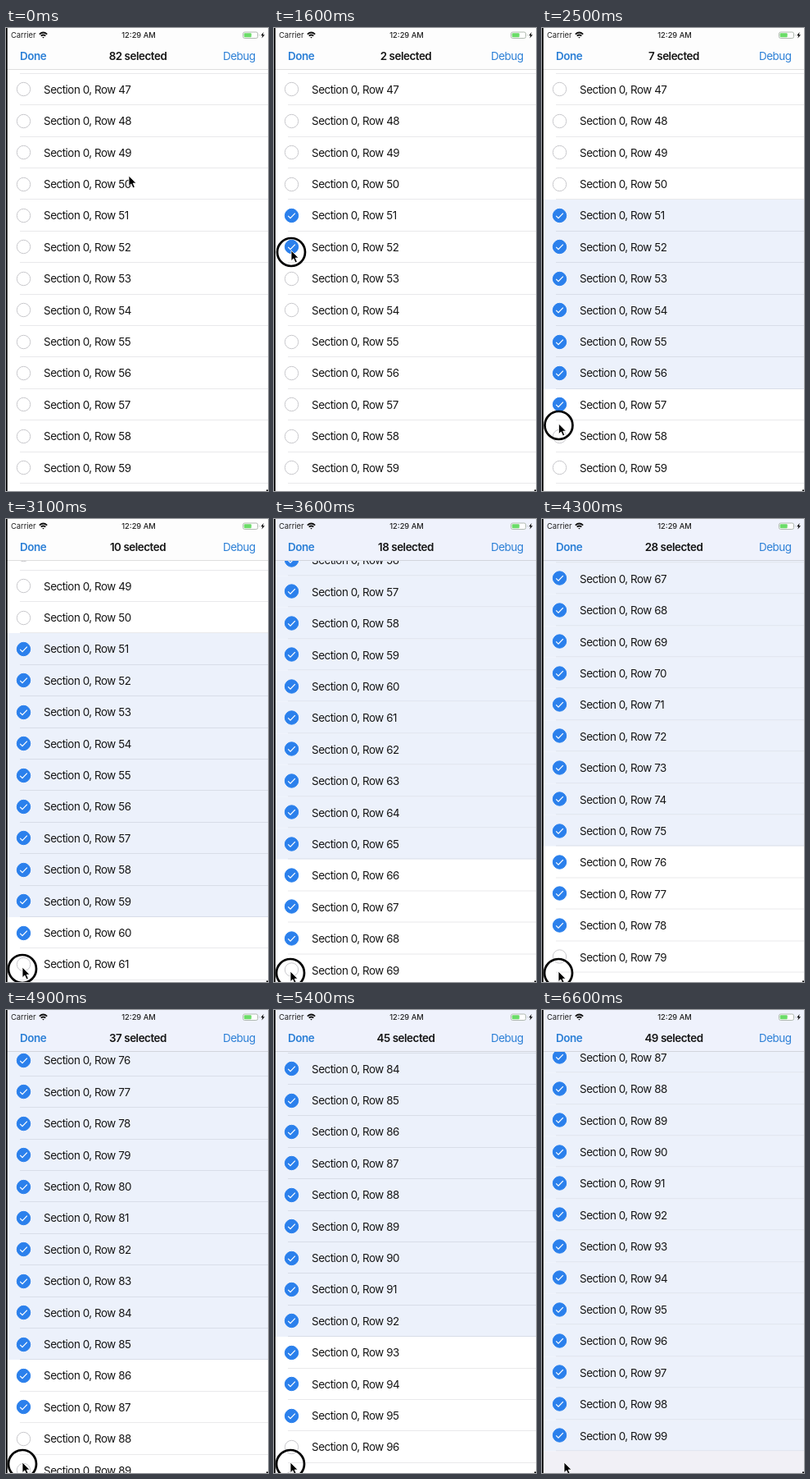
These frames come from a looping animation (320x564 px, 6700 ms). An HTML page:

```html
<!DOCTYPE html>
<html lang="en">
<head>
<meta charset="utf-8">
<title>Multi-select list</title>
<style>
  html, body { margin: 0; width: 100%; height: 100%; overflow: hidden; background: #fff; }
  #stage {
    position: relative; width: 320px; height: 564px; overflow: hidden; background: #fff;
    font: 13.4px/18px Inter, Roboto, sans-serif; letter-spacing: -.46px; color: #151515;
  }
  #list { position: absolute; left: 0; top: 0; width: 320px; }
  .row { position: absolute; left: 0; width: 320px; height: 38.4px; line-height: 38.4px; white-space: pre; }
  .row.lit { background: #ecf1fb; }
  .row::after {
    content: ""; position: absolute; left: 17px; right: 0; bottom: 0; height: 1px; background: rgba(60, 60, 75, .11);
  }
  .row span { position: absolute; left: 46px; }
  .row svg { position: absolute; left: 12px; top: 9.7px; width: 19px; height: 19px; }
  .dot { fill: #fff; stroke: #c9c9cd; }
  .tick { fill: none; stroke: none; stroke-width: 1.2; }
  .on .dot { fill: #2b80ec; stroke: #2b80ec; }
  .on .tick { stroke: #fff; }
  #footer { position: absolute; left: 0; width: 320px; height: 200px; background: #f1f0f6; }
  #nav { position: absolute; left: 0; top: 0; width: 320px; height: 50px; border-bottom: 1px solid rgba(0, 0, 0, .12); }
  #nav div { position: absolute; top: 24.5px; white-space: pre; }
  #nav .link { color: #2b7fd6; }
  #nav .bold { font-weight: 600; }
  #title { left: 0; width: 322px; text-align: center; }
  #nav .status { top: 0; font-size: 9.3px; letter-spacing: 0; color: #222; }
  #overlay { position: absolute; left: 0; top: 0; }
</style>
</head>
<body>
<div id="stage">
  <div id="list"></div>
  <div id="nav">
    <div class="status" style="left:6px">Carrier</div>
    <div class="status" style="left:0;width:324px;text-align:center;font-weight:500">12:29 AM</div>
    <div class="link bold" style="left:17px">Done</div>
    <div class="bold" id="title"></div>
    <div class="link" style="right:15.5px">Debug</div>
  </div>
  <svg id="overlay" width="320" height="564">
    <g fill="none" stroke="#111" stroke-width="1.7">
      <path d="M40.8 7.6Q45.5 3.4 50.2 7.6M42.7 9.7Q45.5 7.3 48.3 9.7"/>
      <path d="M44.2 10.9H46.8L45.5 12.4Z" fill="#111" stroke="none"/>
    </g>
    <rect x="289.5" y="5" width="18" height="7.5" rx="2" fill="#fff" stroke="#a9b3a9" stroke-width=".9"/>
    <rect x="290.7" y="6.2" width="9" height="5.1" rx="1" fill="#6bdc68"/>
    <path d="M309 7.4Q310.3 8.7 309 10Z" fill="#a9b3a9"/>
    <path d="M314.6 5L311.2 9.3H313.2L312.4 12.6L316 8.2H313.9Z" fill="#111"/>
    <path d="M0 0H1.7V564H0ZM318 562.5H320V564H318Z" fill="#000"/>
    <g id="cursor">
      <circle id="ring" cy="2" r="17" fill="none" stroke="#000" stroke-width="2.7"/>
      <path d="M0 0V12.6L2.9 9.9L5.1 14.8L7.3 13.8L5.2 9.1H9Z" fill="#000" stroke="#fff" stroke-width=".8"/>
    </g>
  </svg>
</div>
<script>
  const LOOP = 6700, STEP = 100;
  const PITCH = 38.4, FIRST = 44, LAST = 99, START = 51;
  const TOUCH = 1400, CHECK_LAG = 90, LIT_LAG = 275;

  // Keyframes: time, then values
  const scrollKeys = [[2980, 0], [3100, 70], [3600, 370.5], [4300, 770.5], [5400, 1424], [5620, 1553.5]];
  const cursorKeys = [
    [0, 150, 180], [400, 80, 250], [700, 52, 226], [1000, 21, 227], [1400, 21, 227], [1600, 21, 271],
    [2100, 21, 410], [2800, 20, 536], [3100, 20, 546], [3500, 20, 551], [6300, 20, 551], [6600, 27, 551]
  ];

  const $ = id => document.getElementById(id);
  const clamp = (v, lo, hi) => Math.min(hi, Math.max(lo, v));
  const rowTop = n => 55.8 + (n - 47) * PITCH;

  function sample(keys, t, i) {
    if (t <= keys[0][0]) return keys[0][i];
    for (let k = 1; k < keys.length; k++) {
      const a = keys[k - 1], b = keys[k];
      if (t <= b[0]) return a[i] + (b[i] - a[i]) * (t - a[0]) / (b[0] - a[0]);
    }
    return keys[keys.length - 1][i];
  }

  // Last row reached by the drag at time t
  function reached(t) {
    if (t < TOUCH) return START - 1;
    const y = sample(cursorKeys, t, 2) + 2 + sample(scrollKeys, t, 1);
    return clamp(Math.floor((y - rowTop(0)) / PITCH), START, LAST);
  }

  const rows = [];
  for (let n = FIRST; n <= LAST; n++) {
    const el = document.createElement("div");
    el.style.top = rowTop(n) + "px";
    el.innerHTML = '<svg viewBox="0 0 19 19"><circle class="dot" cx="9.5" cy="9.5" r="8.2"/>' +
      `<path class="tick" d="M5.2 9.9L8 12.7L13.8 6.6"/></svg><span>Section 0, Row ${n}</span>`;
    $("list").append(el);
    rows.push({ n, el });
  }
  const footer = document.createElement("div");
  footer.id = "footer";
  footer.style.top = rowTop(LAST + 1) + "px";
  $("list").append(footer);

  function draw(t) {
    const scroll = sample(scrollKeys, t, 1);
    const checked = reached(t - CHECK_LAG), lit = reached(t - LIT_LAG);
    $("list").style.transform = `translateY(${-scroll}px)`;
    for (const { n, el } of rows) {
      el.className = "row" + (n >= START && n <= checked ? " on" : "") + (n >= START && n <= lit ? " lit" : "");
    }
    const count = checked - START + 1;
    $("title").textContent = (count || 82) + " selected";
    const tint = clamp((scroll - 130) / 90, 0, 1);
    $("nav").style.background = `rgb(${253 - 14 * tint}, ${253 - 11 * tint}, ${253 - tint})`;
    $("cursor").setAttribute("transform", `translate(${sample(cursorKeys, t, 1)} ${sample(cursorKeys, t, 2)})`);
    $("ring").style.display = t >= 1200 && t < 6200 ? "" : "none";
  }

  function tick() {
    const t = performance.now() % LOOP;
    draw(Math.floor(t / STEP) * STEP);
    requestAnimationFrame(tick);
  }
  tick();
</script>
</body>
</html>
```
